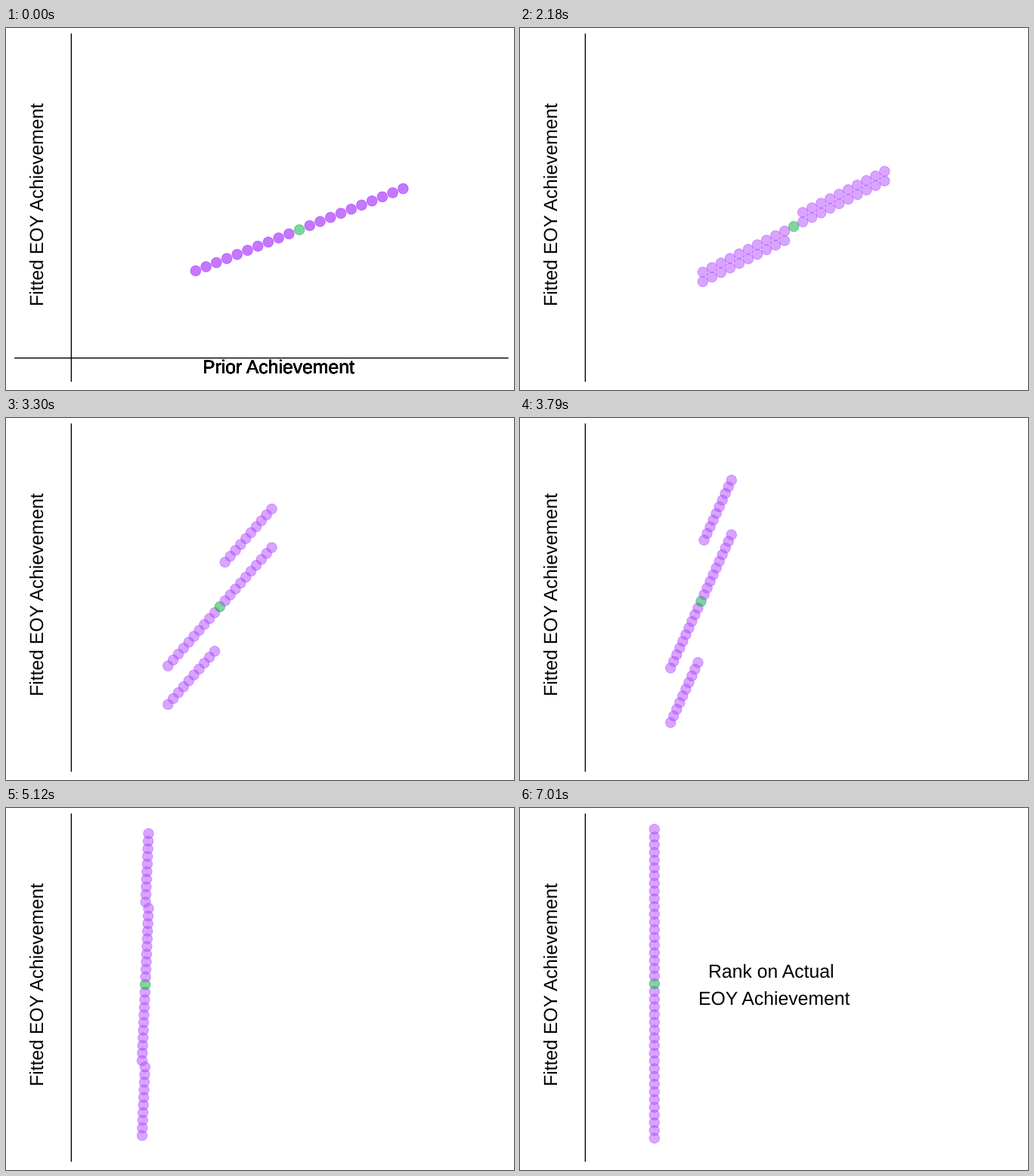
These frames come from a looping animation (672x480 px, 8000 ms). A matplotlib script:

```python
import numpy as np
import matplotlib.pyplot as plt
from matplotlib.animation import FuncAnimation

plt.rcParams["font.family"] = "Liberation Sans"
plt.rcParams["text.hinting"] = "no_hinting"

W, H, DPI = 672, 480, 96
PT = 72 / DPI                  # points per pixel
LOOP, INTERVAL = 8000, 20      # ms
START, STEP = 500, 70          # first move and time per step, ms
STEPS, LEAD = 84, 2
CAPTION_AT = 7010
PURPLE, GREEN = "#b34dff", "#00ae3c"

fig = plt.figure(figsize=(W / DPI, H / DPI), dpi=DPI, facecolor="white")
ax = fig.add_axes([0, 0, 1, 1])
ax.set(xlim=(0, W), ylim=(H, 0))
ax.axis("off")


def rule(xs, ys):
    line, = ax.plot(xs, ys, color="black", lw=1.42 * PT,
                    solid_capstyle="butt", snap=False)
    return line


def label(x, y, text, **kw):
    return ax.text(x, y, text, size=18.6, color="black", ha="center",
                   va="baseline", rotation_mode="anchor", **kw)


# Each column holds two points that part ways; the middle one stays single.
left, right = np.arange(-10, 0), np.arange(1, 11)
col = np.concatenate([left, left, [0], right, right])
rank = np.concatenate([left - 10, left, [0], right, right + 10])
begin = np.column_stack([388.1 + 13.72 * col, 267.5 - 5.45 * col])
end = np.column_stack([np.full(col.size, 177.8), 233 - 10.24 * rank])

rule([86.4, 86.4], [7.33, 469])
label(50, 233.3, "Fitted EOY Achievement", rotation=90)

x_axis = [rule([11, 664.67], [437.6, 437.6])]
# The label is stacked many times, which hardens its edges.
x_axis += [label(360.4, 458, "Prior Achievement") for _ in range(8)]

caption = [label(332.5, 225, "Rank on Actual"),
           label(336.6, 261, "EOY Achievement")]

dots = ax.scatter(*begin.T, s=(13.4 * PT) ** 2, lw=0.95 * PT, alpha=0.5,
                  c=[PURPLE if c else GREEN for c in col])


def ease(p):
    return 4 * p ** 3 if p < 0.5 else 1 - 4 * (1 - p) ** 3


def update(i):
    t = (i + 0.5) * INTERVAL
    step = min(max(int((t - START) // STEP) + 1, 0), STEPS)
    e = ease((step + LEAD) / (STEPS + LEAD))
    dots.set_offsets(begin + (end - begin) * e)
    for artist in x_axis:
        artist.set_visible(t < START)
    for artist in caption:
        artist.set_visible(t >= CAPTION_AT)
    return [dots, *x_axis, *caption]


anim = FuncAnimation(fig, update, frames=LOOP // INTERVAL, interval=INTERVAL,
                     repeat=True, repeat_delay=0, blit=False)
plt.show()
```
